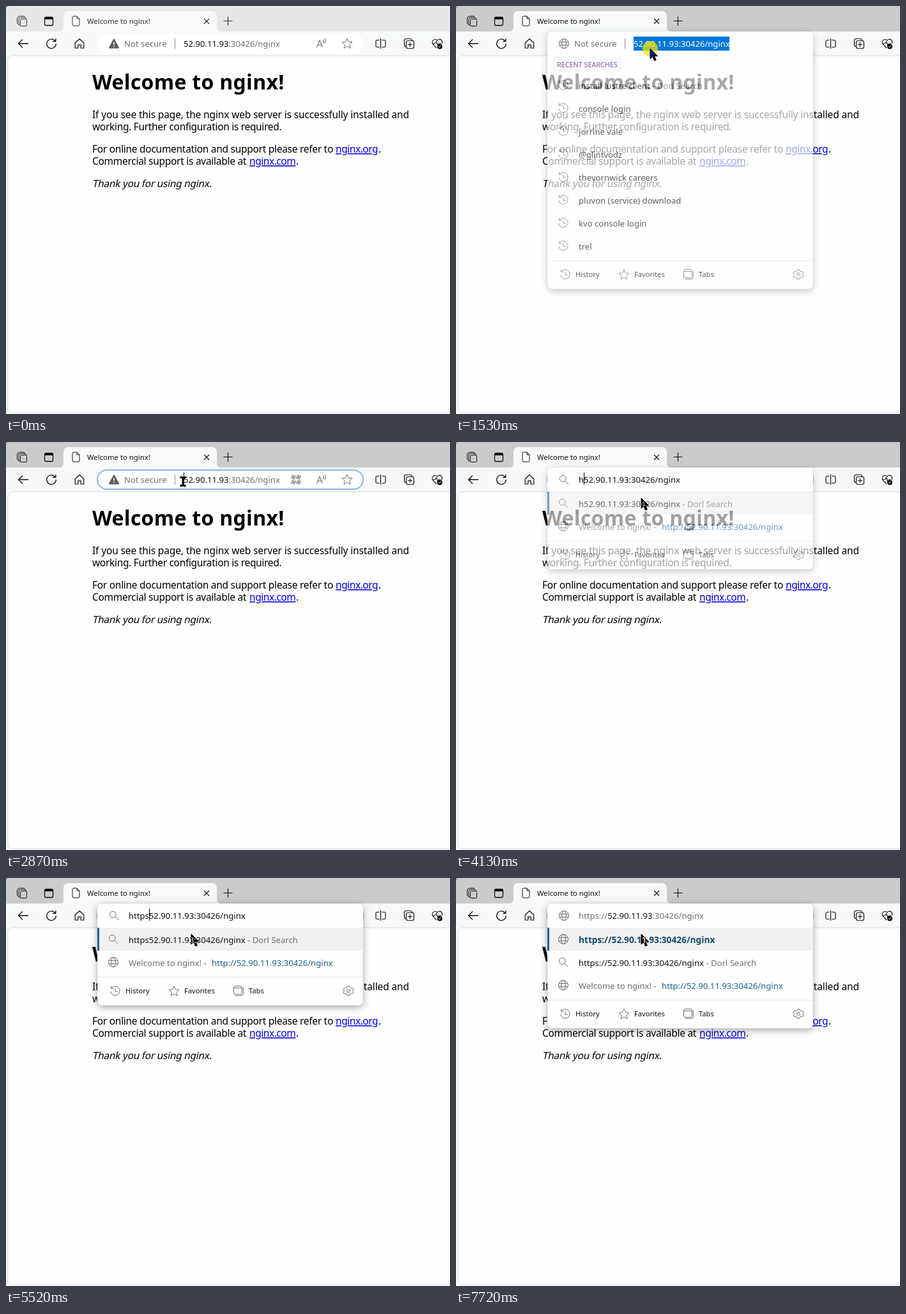
These frames come from a looping animation (695 px wide and 640 px high, 8000 ms). An HTML page:

```html
<!DOCTYPE html>
<html lang="en">
<head>
<meta charset="utf-8">
<title>Address bar</title>
<style>
  html, body { margin: 0; width: 100%; height: 100%; overflow: hidden; background: #fefefe; }
  svg { display: block; font-family: "Noto Sans", "Open Sans", sans-serif; }
  text { white-space: pre; }
  .shadow { filter: drop-shadow(0 3px 6px #0005); }
  .invert { mix-blend-mode: difference; }
</style>
</head>
<body>
<svg id="stage" width="695" height="640" viewBox="0 0 695 640"></svg>
<script>
const LOOP = 8000;
const HOST = '52.90.11.93', REST = ':30426/nginx', URL_TEXT = HOST + REST;
const INK = '#111', GRAY = '#6e6e6e', LINK_BLUE = '#1c6291';
const RECENT = ['install lustre client', 'console login', 'jorrine vale', '@glintvodz',
  'thevornwick careers', 'pluvon (service) download', 'kvo console login', 'trel'];

// Icons are drawn around their centre.
const STAR = 'M0-8 2.3-2.7 8-2.2 3.7 1.6 5 7.2 0 4.3-5 7.2-3.7 1.6-8-2.2-2.3-2.7Z';
const ICONS = {
  globe: '<circle r="7.5"/><ellipse rx="3.4" ry="7.5"/><path d="M-7-2.6H7M-7 2.6H7"/>',
  search: '<circle cx="-1.7" cy="-1.7" r="4.9"/><path d="M2 2 7 7"/>',
  history: '<path d="M-5.6-4.6A7.2 7.2 0 1 1-7.2 1M-6.5-7.5V-3.8H-2.5M0-4V1H4"/>',
  star: `<path d="${STAR}" stroke-linejoin="round"/>`,
  tabs: '<rect x="-7.5" y="-7.5" width="13" height="13" rx="2.5"/><path d="M-7-4.5H5M-5 7.5H4.5A3 3 0 0 0 7.5 4.5V-5"/>',
  gear: '<circle r="2.4"/><path stroke-linejoin="round" d="M-1.6-7.4H1.6L2.3-5.2 4.5-4 6.7-4.5 8.2-1.8 6.4 0 8.2 1.8 6.7 4.5 4.5 4 2.3 5.2 1.6 7.4H-1.6L-2.3 5.2-4.5 4-6.7 4.5-8.2 1.8-6.4 0-8.2-1.8-6.7-4.5-4.5-4-2.3-5.2Z"/>',
  warning: '<path d="M0-6.5 7 6.5H-7Z" fill="#5c5c5c" stroke="#5c5c5c" stroke-width="2" stroke-linejoin="round"/><path d="M0-2.5V2.2M0 3.6V5.2" stroke="#fff" stroke-width="1.5"/>',
  spaces: '<rect x="-2.5" y="-3.5" width="10" height="11" rx="2"/><path d="M-5 5.5V-3A3 3 0 0 1-2-6H5M-7.5 3V-4A4 4 0 0 1-3.5-8H3M-7.5 3-5 5.5-2.5 7M3-8 5-6 7-3.5"/>',
  window: '<rect x="-6.5" y="-6.5" width="13" height="13" rx="2.2" stroke-width="1.3"/><path d="M-6-4.7H6" stroke-width="3.4"/>',
  page: '<path d="M-5.5-5.5A2 2 0 0 1-3.5-7.5H1.5L5.5-3.5V5.5A2 2 0 0 1 3.5 7.5H-3.5A2 2 0 0 1-5.5 5.5ZM1.5-7.5V-3.5H5.5"/>',
  close: '<path d="M-4-4 4 4M4-4-4 4" stroke-width="1.2"/>',
  plus: '<path d="M-7 0H7M0-7V7" stroke-width="1.2"/>',
  back: '<path d="M8 0H-7M-1-6.5-7.5 0-1 6.5" stroke-width="1.3"/>',
  reload: '<path d="M6.3-3.5A7.3 7.3 0 1 0 7.3 0M6.8-8V-3.5H2.3" stroke-width="1.3"/>',
  home: '<path d="M-6.8-1 0-7.5 6.8-1V7H2.2V1.8H-2.2V7H-6.8Z" stroke-width="1.2" stroke-linejoin="round"/>',
  read: '<path d="M-7.5 6-3 -5 1.5 6M-6 2.3H0M2.5-6A4 4 0 0 1 2.5-1M5-8A7 7 0 0 1 5 0" stroke-width="1.1"/>',
  split: '<path d="M-2-5.5H-5.5A2 2 0 0 0-7.5-3.5V3.5A2 2 0 0 0-5.5 5.5H-2M2-5.5H5.5A2 2 0 0 1 7.5-3.5V3.5A2 2 0 0 1 5.5 5.5H2M0-8V8" stroke-width="1.2"/>',
  collect: '<path d="M-5 4.5A2.5 2.5 0 0 1-7.5 2V-5A2.5 2.5 0 0 1-5-7.5H2A2.5 2.5 0 0 1 4.5-5" stroke-width="1.2"/><rect x="-4.5" y="-4.5" width="12" height="12" rx="2.5" stroke-width="1.2"/><path d="M1.5-2V5M-2 1.5H5" stroke-width="1.2"/>',
  health: '<path d="M-1 7-6.5 1.2A4.3 4.3 0 0 1 0-5 4.3 4.3 0 0 1 7 0M-8 0H-3.5L-1.5-3 1 2.5 2.5 0H6" stroke-width="1.2"/><circle cx="4" cy="4.5" r="4" fill="#111" stroke="none"/><path d="M2.2 4.5 3.5 5.8 5.8 3.3" stroke="#fff"/>',
  grid: '<path d="M-6.5-6.5H-1.5V-1.5H-6.5ZM1.5-6.5H6.5V-1.5H1.5ZM-6.5 1.5H-1.5V6.5H-6.5ZM1.5 1.5H6.5V6.5H1.5Z" stroke-width="1.6" stroke-dasharray="3.4 1.6"/><path d="M-5-4H-3M3-4H5M-5 4H-3M3 4H5" stroke-width="2"/>'
};

const stage = document.getElementById('stage');
const ruler = document.createElement('canvas').getContext('2d');
ruler.font = '13.1px "Noto Sans", "Open Sans", sans-serif';

const clamp = v => Math.max(0, Math.min(1, v));
const icon = (name, x, y, color = GRAY) =>
  `<g transform="translate(${x} ${y})" fill="none" stroke="${color}">${ICONS[name]}</g>`;
const text = (x, y, s, fill = INK, size = 13.1, more = '') =>
  `<text x="${x}" y="${y}" fill="${fill}" font-size="${size}" ${more}>${s}</text>`;
const rect = (x, y, w, h, fill, more = '') =>
  `<rect x="${x}" y="${y}" width="${w}" height="${h}" fill="${fill}" ${more}/>`;
const span = (s, fill = GRAY) => `<tspan fill="${fill}">${s}</tspan>`;
const webSearch = s => s + span(' - Dorl Search');

function webPage() {
  const line = (x, y, s, gap = -.28, fill = '#000', more = '') =>
    text(x, y, s, fill, 15.5, `letter-spacing="${gap}" ${more}`);
  const link = (x, y, s) => line(x, y, s, -.45, '#00e', 'text-decoration="underline"');
  return rect(3, 78, 720, 560, '#fefefe', 'rx="8" stroke="#d9dbdb"') +
    text(135, 131, 'Welcome to nginx!', '#000', 32, 'font-weight="700" letter-spacing=".3"') +
    line(135, 176, 'If you see this page, the nginx web server is successfully installed and', -.14) +
    line(135, 195, 'working. Further configuration is required.', -.32) +
    line(135, 230, 'For online documentation and support please refer to') +
    link(516, 230, 'nginx.org') + line(583, 230, '.') +
    line(135, 249, 'Commercial support is available at') +
    link(381, 249, 'nginx.com') + line(454, 249, '.') +
    `<g transform="translate(135 284) skewX(-12)">${line(0, 0, 'Thank you for using nginx.')}</g>`;
}

function browser(active) {
  const ink = active ? INK : '#333';
  return rect(0, 0, 695, 640, '#f7f9f9') + rect(0, 0, 695, 40, active ? '#cbcbcb' : '#e7e7e7') +
    '<path d="M0 0H5A5 5 0 0 0 0 5Z" fill="#999"/>' +
    '<path d="M84 40A6 6 0 0 0 90 34V15A7 7 0 0 1 97 8H323A7 7 0 0 1 330 15V34A6 6 0 0 0 336 40Z" fill="#f8fafa"/>' +
    icon('spaces', 25, 24, ink) + icon('window', 67, 24, INK) + icon('page', 109.5, 23.5, ink) +
    text(127, 28, 'Welcome to nginx!', ink, 11.35) +
    icon('close', 314, 24, ink) + icon('plus', 347.5, 23.5, ink) +
    icon('back', 27, 59, INK) + icon('reload', 71, 59, INK) + icon('home', 115, 59, INK) +
    icon('split', 586.5, 59, INK) + icon('collect', 631, 59, INK) + icon('health', 675, 59, INK);
}

const security = name => icon(name, 169, 59) + text(185, 64, 'Not secure', GRAY) +
  rect(264, 51, 1, 16, '#8a8a8a');
const caret = x => rect(x, 48, 1, 19, '#000');

function addressBar(focused, caretOn) {
  return rect(143, 44, 416, 30, '#fff', `rx="15" ${focused ? 'stroke="#8eb1ea" stroke-width="2"' : ''}`) +
    security('warning') + text(278, 64, HOST + span(REST)) +
    (focused ? icon('grid', 454, 59) : '') + icon('read', 494, 59) + icon('star', 534, 59) +
    (focused && caretOn ? caret(278) : '');
}

function panel(bottom, opacity, header, rows) {
  const foot = bottom - 23;
  return `<g opacity="${opacity}">` +
    rect(143, 40, 416, bottom - 40, '#fefefe', 'rx="7" class="shadow" stroke="#0002" stroke-width=".7"') + rows +
    rect(143, bottom - 45, 416, 1, '#e6e6e6') +
    icon('history', 171, foot) + text(187, foot + 4, 'History', INK, 11.2) +
    icon('star', 263, foot + .5) + text(279, foot + 4, 'Favorites', INK, 11.2) +
    icon('tabs', 364, foot) + text(380, foot + 4, 'Tabs', INK, 11.2) +
    icon('gear', 536, foot) + '</g>' +
    '<path d="M143 78V47A7 7 0 0 1 150 40H552A7 7 0 0 1 559 47V78Z" fill="#fefefe"/>' + header;
}

function recentPanel(opacity) {
  const header = security('globe') + rect(278, 48, 150, 22, '#0078d7') + text(278, 64, URL_TEXT, '#fff');
  const rows = RECENT.map((s, i) => icon('history', 168, 124 + 36 * i) +
    text(192, 130 + 36 * i, i ? s : webSearch(s)));
  return panel(444, opacity, header, rows.join('')) +
    `<g opacity="${opacity}">` + rect(152, 80, 107, 24, '#f5f5f5', 'rx="3"') +
    text(158, 96, 'RECENT SEARCHES', '#46116b', 10.8) + '</g>';
}

function typingPanel(typed, opacity, caretOn) {
  const isUrl = typed.includes(':');
  const visit = { icon: 'globe', draw: y => text(192, y, 'https://' + URL_TEXT, '#174a70', 13.7, 'font-weight="700"') };
  const find = { icon: 'search', draw: y => text(192, y, webSearch(typed + URL_TEXT)) };
  const known = { icon: 'globe', draw: y => text(192, y, 'Welcome to nginx! -', GRAY) +
    text(322, y, 'http://' + URL_TEXT, LINK_BLUE) };
  const list = !isUrl ? [find, known] : typed.endsWith('//') ? [visit, find, known] : [visit, find];

  const rows = rect(143, 78, 416, 36, '#f1f1f1') + rect(143, 78, 3, 36, '#1c669e') +
    list.map((row, i) => icon(row.icon, 168, 96 + 36 * i) + row.draw(102 + 36 * i)).join('');
  const entry = isUrl ? span(typed) + HOST + span(REST) : typed + URL_TEXT;
  const header = icon(isUrl ? 'globe' : 'search', 169, 59) + text(192, 64, entry) +
    (caretOn ? caret(Math.round(192 + ruler.measureText(typed).width)) : '');
  return panel(128 + 36 * list.length, opacity, header, rows);
}

// Pointer path: time, x, y
const PATH = [[400, 565, 382], [900, 289, 53], [1200, 304, 67], [1740, 304, 67], [2000, 303, 70],
  [2199, 303, 70], [2200, 292, 53], [2270, 292, 53], [2530, 277, 62], [2870, 277, 62],
  [2990, 291, 89], [3079, 291, 89], [3080, 290, 88], [LOOP, 290, 88]];

function pointer(t) {
  if (t < PATH[0][0]) return '';
  const i = PATH.findIndex(k => k[0] > t);
  const [t0, x0, y0] = PATH[i - 1], [t1, x1, y1] = PATH[i];
  const p = (t - t0) / (t1 - t0), e = p * p * (3 - 2 * p);
  const x = x0 + (x1 - x0) * e, y = y0 + (y1 - y0) * e;
  const beam = t < 1470 ? y < 76 : t >= 2400 && t < 3080;
  const pressed = t >= 2200 ? 2200 : 1400;
  const glow = t < pressed ? 0 : clamp(1 - (t - pressed - 340) / 260);
  const arrow = 'd="M0 0V16L3.8 12.5 6.6 19 9.3 17.8 6.6 11.5H11.5Z"';
  return `<g transform="translate(${x.toFixed(1)} ${y.toFixed(1)})">` +
    `<circle r="12" fill="#f0e600" opacity="${(.72 * glow).toFixed(2)}"/>` +
    (beam
      ? '<path d="M-4.5-8H-1L0-7 1-8H4.5V-5H1.5V5H4.5V8H1L0 7-1 8H-4.5V5H-1.5V-5H-4.5Z"/></g>'
      : `</g><path ${arrow} transform="translate(${x.toFixed(1)} ${y.toFixed(1)})" fill="#fff" class="invert"/>` +
        `<path ${arrow} transform="translate(${x.toFixed(1)} ${y.toFixed(1)})" fill="none" stroke="#000"/>`);
}

const KEY_TIMES = [4130, 4660, 5120, 5450, 5520, 5980, 6990, 7190];
const CARET_OFF = [[3330, 3860], [6460, 6990], [7720, LOOP]];

function scene(t) {
  const typed = 'https://'.slice(0, KEY_TIMES.filter(k => t >= k).length);
  const caretOn = !CARET_OFF.some(([a, b]) => t >= a && t < b);
  let overlay = '';
  if (typed) overlay = typingPanel(typed, t < 4190 ? .63 : 1, caretOn);
  else if (t >= 1470 && t < 2400) overlay = recentPanel(clamp((t - 1400) / 200).toFixed(2));
  return browser(t >= 1470) + webPage() + addressBar(t >= 2400, caretOn) + overlay + pointer(t);
}

let shown = '';
function frame(now) {
  const next = scene(now % LOOP);
  if (next !== shown) stage.innerHTML = shown = next;
  requestAnimationFrame(frame);
}
frame(0);
</script>
</body>
</html>
```
